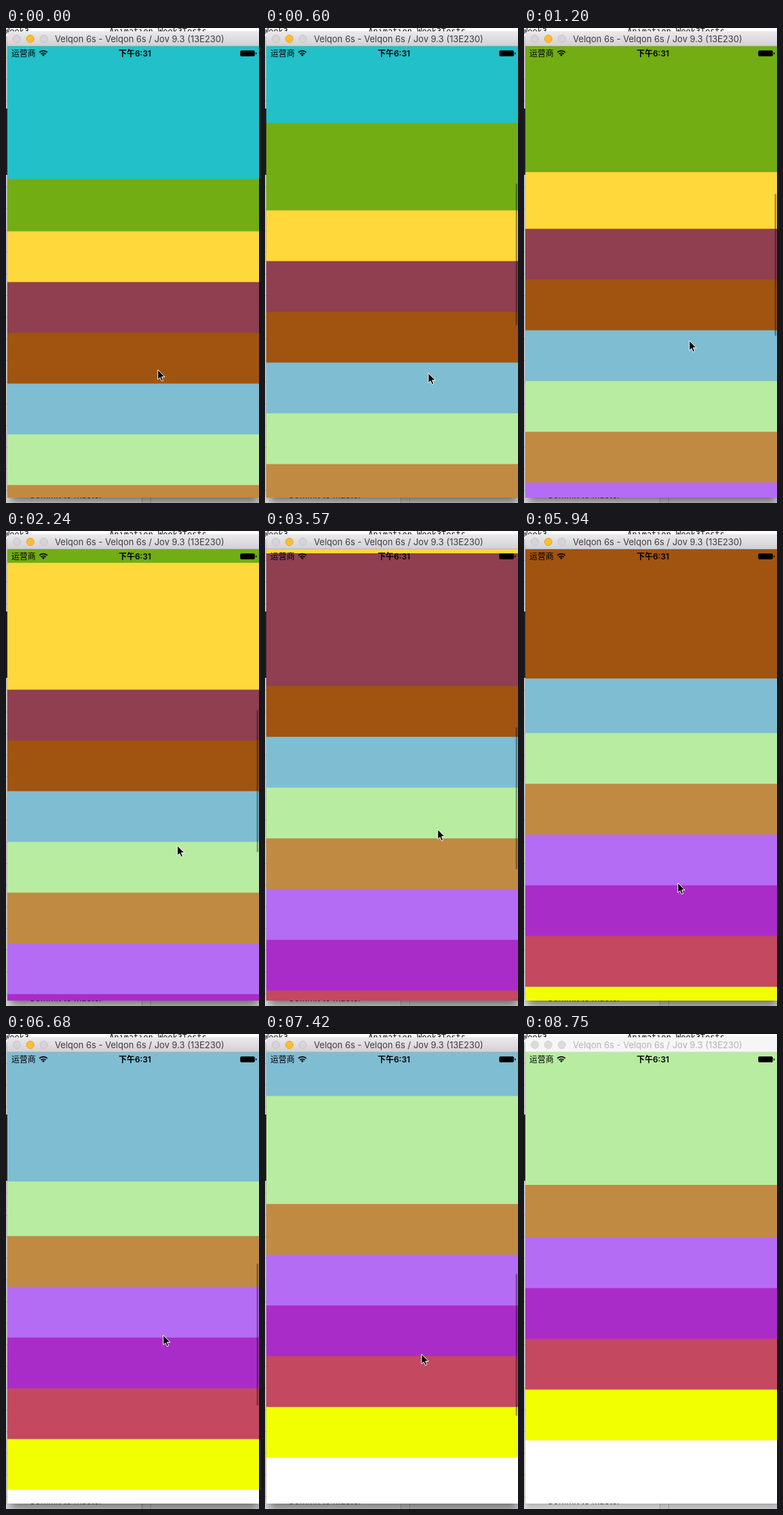
Recreate the animation shown at these times as an HTML page with a canvas. Size 375 by 702 pixels, loop 8850 ms.

```html
<!DOCTYPE html>
<html lang="zh-CN">
<head>
<meta charset="utf-8">
<title>Stacked cells</title>
<style>
html, body { margin: 0; width: 100%; height: 100%; overflow: hidden; }
#stage { position: relative; width: 375px; height: 702px; overflow: hidden; background: #dcdcdc; font-family: Inter, Roboto, sans-serif; }
#stage * { position: absolute; box-sizing: border-box; white-space: pre; }
.top { left: 0; top: 0; width: 375px; height: 12px; background: #fff; font: 12px/14px "DejaVu Sans Mono", monospace; color: #111; }
.top span { top: -2px; }
.side { left: 0; top: 12px; width: 8px; height: 690px; background: repeating-linear-gradient(#d9d9d9 0 31px, #bbb 31px 32px); }
.dark { left: 0; top: 119px; width: 8px; height: 98px; background: #26282b; }
.foot { left: 0; top: 690px; width: 375px; height: 12px; background: linear-gradient(90deg, #dedede 215px, #d2d2d2 0); font-size: 13px; line-height: 15px; color: #222; }
.foot span { left: 34px; top: -7px; }
.foot i { left: 201px; top: 0; width: 14px; height: 14px; border: solid #aaa; border-width: 0 1px; background: #d2d2d2; }
#win { left: 2px; top: 5px; width: 376px; height: 689px; border-radius: 5px 5px 0 0; background: #fff; box-shadow: 0 0 1px rgba(0,0,0,.4), 0 12px 14px -4px rgba(0,0,0,.45); }
#bar { left: 0; top: 0; width: 376px; height: 22px; border-radius: 5px 5px 0 0; background: linear-gradient(#ebe9eb, #d3d1d3); border-bottom: 1px solid #b9b7b9; }
#bar i { top: 5px; width: 12px; height: 12px; border-radius: 50%; background: #d6d4d6; border: 1px solid #c4c2c4; }
#bar i.on { background: #fdbe32; border-color: #e2a32a; }
#bar span { left: 0; width: 392px; top: 2px; text-align: center; font-size: 13px; line-height: 18px; color: #3e3c3e; }
.idle #win { box-shadow: 0 0 1px rgba(0,0,0,.35), 0 5px 10px rgba(0,0,0,.2); }
.idle #bar { background: #f6f6f6; border-color: #ddd; }
.idle #bar i, .idle #bar i.on { background: #dcdcdc; border-color: #d0d0d0; }
.idle #bar span { color: #b2b2b2; }
#view { left: 0; top: 22px; }
.status { left: 0; top: 0; }
#arrow { left: 0; top: 0; overflow: visible; }
</style>
</head>
<body>
<div id="stage">
  <div class="top"><span style="left:-2px">Week3</span><span style="left:153px">Animation_Week3Tests</span></div>
  <div class="side"></div><div class="dark"></div>
  <div class="foot"><span>Commit to master</span><i></i></div>
  <div id="win">
    <div id="bar">
      <i style="left:8px"></i><i class="on" style="left:28px"></i><i style="left:48px"></i>
      <span>Velqon 6s - Velqon 6s / Jov 9.3 (13E230)</span>
    </div>
    <canvas id="view" width="374" height="667"></canvas>
  </div>
  <svg class="status" width="375" height="60" font-family="Inter, 'Noto Sans CJK SC', sans-serif" font-size="12">
    <text x="8" y="41.5">运营商</text>
    <text x="191" y="41.5" text-anchor="middle" font-weight="600">下午6:31</text>
    <g fill="none" stroke="#000" stroke-width="1.8">
      <path d="M49.5 36a8.2 8.2 0 0 1 11.6 0"/>
      <path d="M51.8 38.5a5 5 0 0 1 7 0"/>
    </g>
    <path d="M55.3 42l-2-2.2a2.9 2.9 0 0 1 4 0z"/>
    <rect x="347.5" y="33.5" width="21" height="8" rx="1.5" stroke="#000" stroke-opacity=".6"/>
    <path d="M370 36a1.6 1.6 0 0 1 0 3.2z"/>
  </svg>
  <svg id="arrow" width="14" height="20"><path d="M1 1V15.6L4.3 12.6L6.6 17.8L9 16.7L6.8 11.6H11.4Z" stroke="#fff" stroke-linejoin="round"/></svg>
</div>
<script>
const LOOP = 8850, TICK = 148.1;
const SMALL = 75, TALL = 200, WIDTH = 374, HEIGHT = 667;
const START = .02, REST = .045;
const colors = ["#22c0c8", "#72ad14", "#ffd83b", "#8f3f50", "#a05410", "#7fbdd3",
  "#b8eca0", "#c08a42", "#b56cf5", "#aa2cc8", "#c44860", "#f2ff00"];

// Times in ticks; pos is the scroll in cells at release, x and y the grab point.
const drags = [
  { from: 1, to: 8, rest: 8, pos: 1.07, x: 239, y: 540 },
  { from: 11, to: 15, rest: 19, pos: 1.9, x: 249, y: 526 },
  { from: 21, to: 24, rest: 25, pos: 2.97, x: 250, y: 509 },
  { from: 27, to: 31, rest: 37, pos: 3.955, x: 245, y: 520 },
  { from: 40, to: 42, rest: 45, pos: 4.91, x: 227, y: 519 },
  { from: 47, to: 52, rest: 52, pos: 6.02, x: 228, y: 519 }
];
const LEAVE = 54, GONE = 57, IDLE = 59;

const stage = document.getElementById("stage");
const arrow = document.getElementById("arrow");
const ctx = document.getElementById("view").getContext("2d");

const clamp = v => Math.max(0, Math.min(1, v));
const span = (t, a, b) => clamp((t - a) / (b - a));
const smooth = u => u * u * (3 - 2 * u);
const mix = (a, b, u) => a + (b - a) * u;

function pose(tick) {
  let pos = START, x = 224, y = 504;
  for (const d of drags) {
    if (tick < d.from) break;
    const grab = pos;
    pos = mix(grab, d.pos, smooth(span(tick, d.from, d.to)));
    if (d.rest > d.to) {
      const settle = span(tick, Math.max(d.to, d.rest - 2), d.rest);
      pos = mix(pos, Math.round(d.pos) + REST, settle);
    }
    x = d.x + 5 * (pos - grab);
    y = d.y - SMALL * (pos - grab);
  }
  const out = smooth(span(tick, LEAVE, GONE));
  return { pos, x: mix(x, 250, out), y: mix(y, 710, out) };
}

// The cell under the top one grows from SMALL to TALL as it rises.
function cellTop(d, part) {
  if (d === 0) return -SMALL * part;
  if (d === 1) return TALL * (1 - part);
  return TALL + SMALL * (d - 1 - part);
}

function drawCells(pos) {
  const first = Math.floor(pos);
  [...colors, "#fff"].forEach((color, i) => {
    if (i < first) return;
    ctx.fillStyle = color;
    ctx.fillRect(0, cellTop(i - first, pos - first), WIDTH, 2 * HEIGHT);
  });
}

function drawThumb(tick, pos) {
  const hidden = tick < 2 || (tick > 38 && tick < 41);
  ctx.globalAlpha = hidden ? 0 : .35 * span(tick, GONE, LEAVE);
  ctx.fillStyle = "#000";
  ctx.beginPath();
  ctx.roundRect(369.5, 192.6 + 23.7 * pos, 2.5, 210, 1.25);
  ctx.fill();
  ctx.globalAlpha = 1;
}

function draw() {
  const t = performance.now() % LOOP;
  const tick = Math.max(0, Math.floor((t - 6) / TICK));
  const { pos, x, y } = pose(tick);
  drawCells(pos);
  drawThumb(tick, pos);
  arrow.style.transform = `translate(${Math.round(x)}px, ${Math.round(y)}px)`;
  stage.className = tick >= IDLE ? "idle" : "";
  requestAnimationFrame(draw);
}
draw();
</script>
</body>
</html>
```
